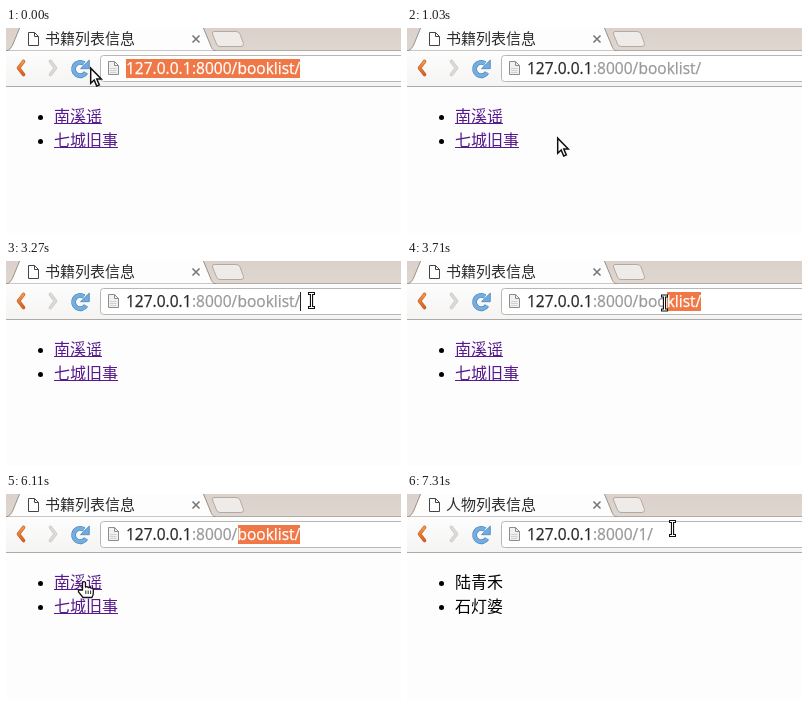
Animation, 395 px wide and 205 px high, one loop 8000 ms. Source, as an HTML page:

```html
<!DOCTYPE html>
<html lang="zh-CN">
<head>
<meta charset="utf-8">
<title>书籍列表信息</title>
<style>
html, body { margin: 0; width: 100%; height: 100%; overflow: hidden; background: #fdfdfd; }
svg { display: block; width: 100vw; height: 100vh; }
text { white-space: pre; }
.cjk { font-family: "Noto Sans CJK SC", "Noto Sans CJK", "Noto Sans", sans-serif; }
.url { font: 15.5px "Open Sans", "Noto Sans", sans-serif; stroke-width: .25px; }
</style>
</head>
<body>
<svg viewBox="0 0 395 205" xmlns="http://www.w3.org/2000/svg">
  <defs>
    <linearGradient id="strip" x2="0" y2="1"><stop stop-color="#dbd1ca"/><stop offset="1" stop-color="#ded6d0"/></linearGradient>
    <linearGradient id="bar" x2="0" y2="1"><stop stop-color="#fdfdfd"/><stop offset="1" stop-color="#f5f4f3"/></linearGradient>
    <linearGradient id="warm" x2="0" y2="1"><stop stop-color="#f39a4a"/><stop offset="1" stop-color="#dc5f20"/></linearGradient>
    <clipPath id="clip"><rect id="clipBox" y="31" height="19"/></clipPath>
    <g id="page" stroke-linejoin="round">
      <path d="M.5 .5H6.5L10.5 4.5V13.5H.5Z"/>
      <path d="M6.5 .5V4.5H10.5" fill="none"/>
    </g>
    <path id="chevron" d="M7.500 2 2.500 8.500 7.500 15" fill="none" stroke-linecap="round" stroke-linejoin="round"/>
  </defs>

  <rect width="395" height="205" fill="#fdfdfd"/>
  <rect width="395" height="23" fill="url(#strip)"/>
  <path d="M0 22.500H395" stroke="#b3aaa4"/>
  <path d="M0 23C4 22 5 20 7 16L14 -1H197L204.500 17C206 21 207 22.500 210 23Z" fill="#fdfdfd" stroke="#989089"/>
  <path d="M208 3.500H230Q233 3.500 234 6L237.500 15.500Q238 18.500 235 18.500H214Q211.500 18.500 210.500 16L206.500 6Q206 3.500 208 3.500Z" fill="#efebe8" stroke="#b3aaa4"/>
  <rect y="23" width="395" height="35" fill="url(#bar)"/>
  <path d="M0 58.500H395" stroke="#aaa"/>

  <use href="#page" x="22" y="4" fill="#fff" stroke="#444"/>
  <text id="title" class="cjk" x="39" y="16" font-size="15" fill="#2c2c2c"></text>
  <path d="M186.500 7.500 193.500 14.500M193.500 7.500 186.500 14.500" stroke="#777" stroke-width="1.600"/>

  <g transform="translate(10 31.500)">
    <use href="#chevron" stroke="#c4561c" stroke-width="3.600"/>
    <use href="#chevron" stroke="url(#warm)" stroke-width="2.400"/>
  </g>
  <g transform="translate(52 31.500) scale(-1 1)">
    <use href="#chevron" stroke="#c9c5c2" stroke-width="3.600"/>
    <use href="#chevron" stroke="#dcd9d6" stroke-width="2.400"/>
  </g>

  <rect id="hover" x="62.500" y="27.500" width="26" height="26" rx="3" fill="#f6f6f6" stroke="#c2c0be"/>
  <g fill="none">
    <path d="M80 44.500A6.700 6.700 0 1 1 78 35.500" stroke="#4a86bd" stroke-width="4.800"/>
    <path d="M83.300 32V40.700H74.500Z" fill="#6fabdf" stroke="#4a86bd" stroke-width=".8"/>
    <path d="M80 44.500A6.700 6.700 0 1 1 78 35.500" stroke="#74aee0" stroke-width="3.400"/>
  </g>

  <rect x="94.500" y="27.500" width="310" height="26" rx="3" fill="#fff" stroke="#b9b7b5"/>
  <use href="#page" x="102" y="33" fill="#f1f1f1" stroke="#8c8c8c"/>
  <path d="M104 40.500H110.500M104 42.500H110.500M104 44.500H110.500" stroke="#d0d0d0"/>
  <g class="url" fill="#999" stroke="#999">
    <text x="120" y="46" fill="#2a2a2a" stroke="#2a2a2a">127.0.0.1</text>
    <text x="186" y="46">:8000/</text>
    <text class="tail" x="231.500" y="46"></text>
  </g>
  <rect id="mark" y="31" height="19" fill="#f07746"/>
  <g class="url" fill="#fff" stroke="#fff" clip-path="url(#clip)">
    <text x="120" y="46">127.0.0.1</text>
    <text x="186" y="46">:8000/</text>
    <text class="tail" x="231.500" y="46"></text>
  </g>
  <path id="caret" d="M294.500 31V50" stroke="#222"/>

  <circle cx="34.500" cy="89.500" r="2.500"/>
  <circle cx="34.500" cy="113.500" r="2.500"/>
  <g id="list" class="cjk" font-size="16">
    <text x="48" y="94"></text>
    <text x="48" y="118"></text>
  </g>
  <path id="lines" d="M48 95.500H96M48 119.500H112" stroke="#551a8b"/>

  <g id="arrow" fill="#fff" stroke="#111" stroke-width="1.500">
    <path d="M.7 1.200V16.200L4.200 13 6.700 19 9.300 17.900 6.800 12.100H11.300Z"/>
  </g>
  <g id="beam" fill="none">
    <path d="M-3.500 -7H3.500M0 -7V7M-3.500 7H3.500" stroke="#111" stroke-width="3.200"/>
    <path d="M-2.500 -7H2.500M0 -7V7M-2.500 7H2.500" stroke="#fff"/>
  </g>
  <g id="hand" fill="#fff" stroke="#111" stroke-width="1.300" stroke-linejoin="round">
    <path d="M-1.500 9V2Q-1.500 .6 0 .6T1.500 2V6.200Q3 5 4.300 6.600 5.800 5.600 7 7.200 9.300 6.600 9.300 9V12Q9.300 14 8 16.500H-1L-5.500 10.800Q-6 9 -4 8.800Z"/>
    <path d="M1.800 9.500V13M4.200 9.500V13M6.600 9.500V13" stroke-width=".9"/>
  </g>
</svg>
<script>
const LOOP = 8000, URL_END = 294;
const $ = id => document.getElementById(id);

// Pointer positions, each held until the next: [ms, shape, x, y]
const moves = [
  [0, 'arrow', 84, 39], [150, 'arrow', 82, 40],
  [730, 'arrow', 97, 64], [880, 'arrow', 132, 97], [1030, 'arrow', 150, 109],
  [2380, 'arrow', 160, 103], [2530, 'arrow', 184, 88], [2680, 'arrow', 214, 70],
  [2830, 'arrow', 246, 54], [2980, 'beam', 277.5, 40], [3120, 'beam', 303.5, 32],
  [3270, 'beam', 305.5, 39.5], [3410, 'beam', 299.5, 40], [3560, 'beam', 281.5, 41],
  [3710, 'beam', 257.5, 42], [3860, 'beam', 238.5, 42], [4310, 'beam', 237.5, 42],
  [4760, 'arrow', 234, 40], [4910, 'arrow', 239, 60], [5060, 'arrow', 241, 79],
  [5810, 'arrow', 196, 86], [5960, 'arrow', 118, 87], [6110, 'hand', 78, 87],
  [6710, 'beam', 80.5, 95], [7160, 'beam', 180.5, 62], [7310, 'beam', 265.5, 34.5]
];

// Left edge of the selected address text: [ms, x]
const marks = [
  [0, 120], [440, URL_END], [3560, 284], [3710, 260],
  [3860, 242], [4310, 232], [6560, URL_END]
];

const pages = [
  { title: '书籍列表信息', tail: 'booklist/', items: ['南溪谣', '七城旧事'], ink: '#551a8b' },
  { title: '人物列表信息', tail: '1/', items: ['陆青禾', '石灯婆'], ink: '#000' }
];

const at = (steps, t) => steps.filter(s => s[0] <= t).pop();
const show = (id, on) => $(id).setAttribute('visibility', on ? 'visible' : 'hidden');
let shown = null;

function setPage(page) {
  if (page === shown) return;
  shown = page;
  $('title').textContent = page.title;
  document.querySelectorAll('.tail').forEach(e => e.textContent = page.tail);
  document.querySelectorAll('#list text').forEach((e, i) => e.textContent = page.items[i]);
  $('list').setAttribute('fill', page.ink);
  show('lines', page === pages[0]);
}

function draw(t) {
  setPage(pages[t < 6560 ? 0 : 1]);

  const [, shape, x, y] = at(moves, t);
  for (const id of ['arrow', 'beam', 'hand']) show(id, id === shape);
  $(shape).setAttribute('transform', `translate(${x} ${y})`);

  const left = at(marks, t)[1];
  for (const id of ['mark', 'clipBox']) {
    $(id).setAttribute('x', left);
    $(id).setAttribute('width', URL_END - left);
  }
  show('hover', t >= 150 && t < 730);
  show('caret', t >= 3270 && t < 3560);
}

function tick(now) {
  draw(now % LOOP);
  requestAnimationFrame(tick);
}
draw(0);
requestAnimationFrame(tick);
</script>
</body>
</html>
```
